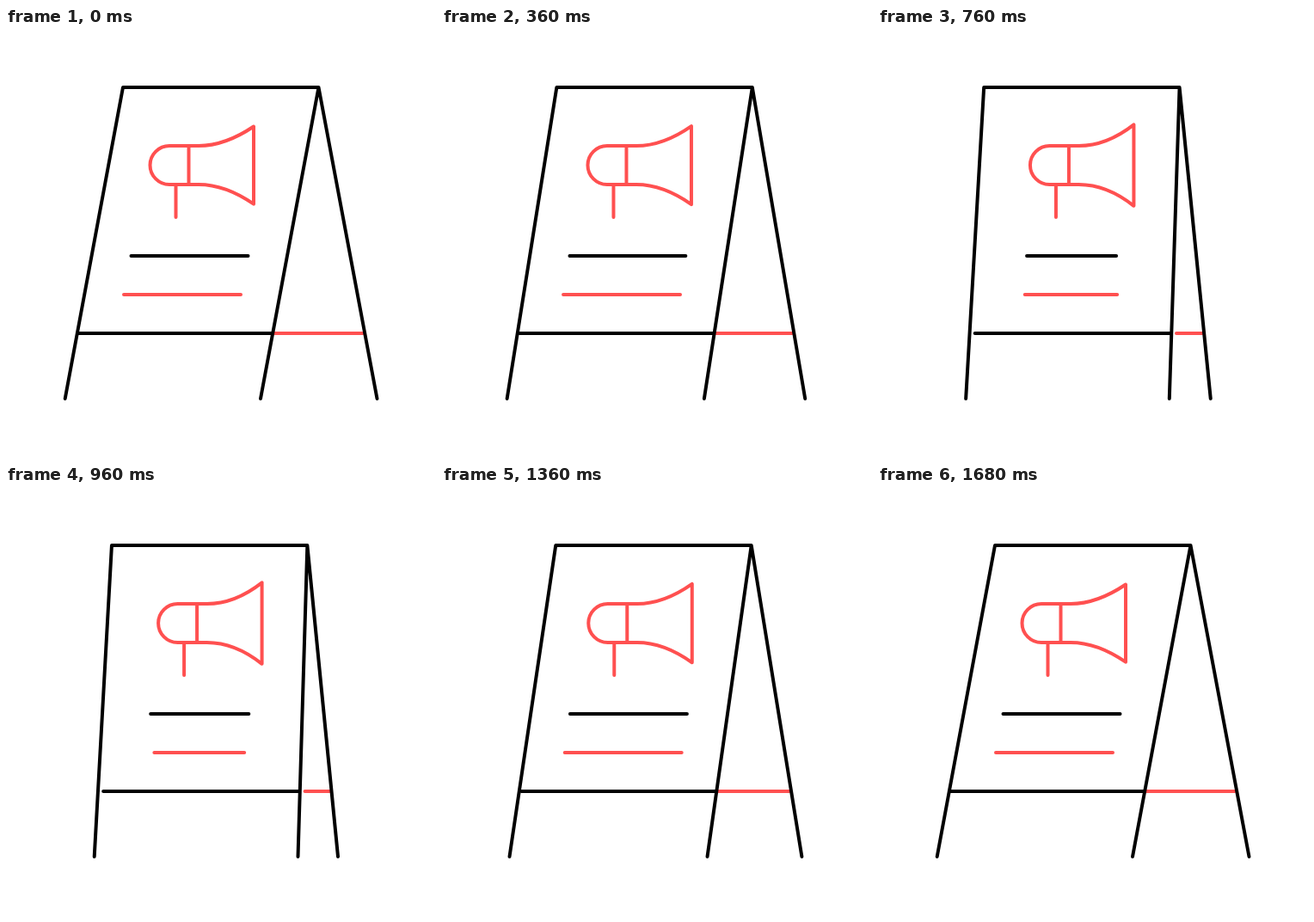
Recreate the animation shown at these times as an HTML page. Size 500 by 500 pixels, loop 1.84 s.

```html
<!DOCTYPE html>
<html lang="en">
<head>
<meta charset="utf-8">
<title>Folding sign</title>
<style>
  html, body { margin: 0; width: 100%; height: 100%; overflow: hidden; background: #fff; }
  svg { display: block; width: 100vw; height: 100vh; }
  path { fill: none; stroke: #000; stroke-width: 4; stroke-linecap: round; stroke-linejoin: round; }
  .red { stroke: #ff5050; }
</style>
</head>
<body>
<svg viewBox="0 0 500 500">
  <path id="horn" class="red"/>
  <path id="note" class="red"/>
  <path id="strut" class="red"/>
  <path id="title"/>
  <path id="bar"/>
  <path id="frame"/>
</svg>
<script>
const LOOP = 1840, STEP = 40;
const TOP = 69, FOOT = 431, BAR = 355;

const clamp = v => Math.min(1, Math.max(0, v));
const mix = (a, b, k) => a + (b - a) * k;
const draw = (id, d) => document.getElementById(id).setAttribute('d', d);
const rule = (x1, x2, y) => `M${x1} ${y}H${x2}`;

// Equivalent to cubic-bezier(.57, 0, .43, 1)
function ease(x) {
  let lo = 0, hi = 1;
  for (let i = 0; i < 24; i++) {
    const s = (lo + hi) / 2;
    const bx = 3 * s * (1 - s) * (0.57 * (1 - s) + 0.43 * s) + s ** 3;
    if (bx < x) lo = s; else hi = s;
  }
  return lo * lo * (3 - 2 * lo);
}

// Rises from 0 to 1 over `half` ms, then falls back
const swing = (t, start, half) => ease(clamp(1 - Math.abs(t - start - half) / half));

function horn(p) {
  const x = 9.7 * p, flare = 2.2 * p;
  const at = n => n + x;
  const top = 114.5 - flare, low = 204.7 + flare;
  return `M${at(288)} ${top}V${low}C${at(268)} 191 ${at(246)} 182 ${at(224)} 182` +
    `H${at(190)}A22.5 22.5 0 0 1 ${at(190)} 137H${at(224)}` +
    `C${at(246)} 137 ${at(268)} 128 ${at(288)} ${top}Z` +
    `M${at(212.5)} 137V182M${at(197.5)} 182V220`;
}

function textLine(center, y, shrink) {
  const half = 68 - 16 * shrink;
  return rule(center - half, center + half, y);
}

function render(t) {
  const p = swing(t, 80, 800);
  const left = mix(136, 122.8, p), right = mix(363.5, 350.2, p);

  draw('frame', `M${mix(68.7, 103.1, p)} ${FOOT}L${left} ${TOP}H${right}` +
    `L${mix(431.5, 385.5, p)} ${FOOT}M${right} ${TOP}L${mix(296, 340, p)} ${FOOT}`);
  draw('bar', rule(mix(84, 113.5, p), mix(309.5, 340.7, p), BAR));
  draw('strut', rule(mix(310.3, 348, p), mix(415, 376, p), BAR));
  draw('horn', horn(p));
  draw('title', textLine(mix(213.5, 225.4, p), 265, swing(t, 280, 480)));
  draw('note', textLine(mix(205, 225, p), 310, swing(t, 410, 480)));
}

function tick() {
  const t = performance.now() % LOOP;
  render(Math.floor(t / STEP) * STEP);
  requestAnimationFrame(tick);
}
tick();
</script>
</body>
</html>
```
